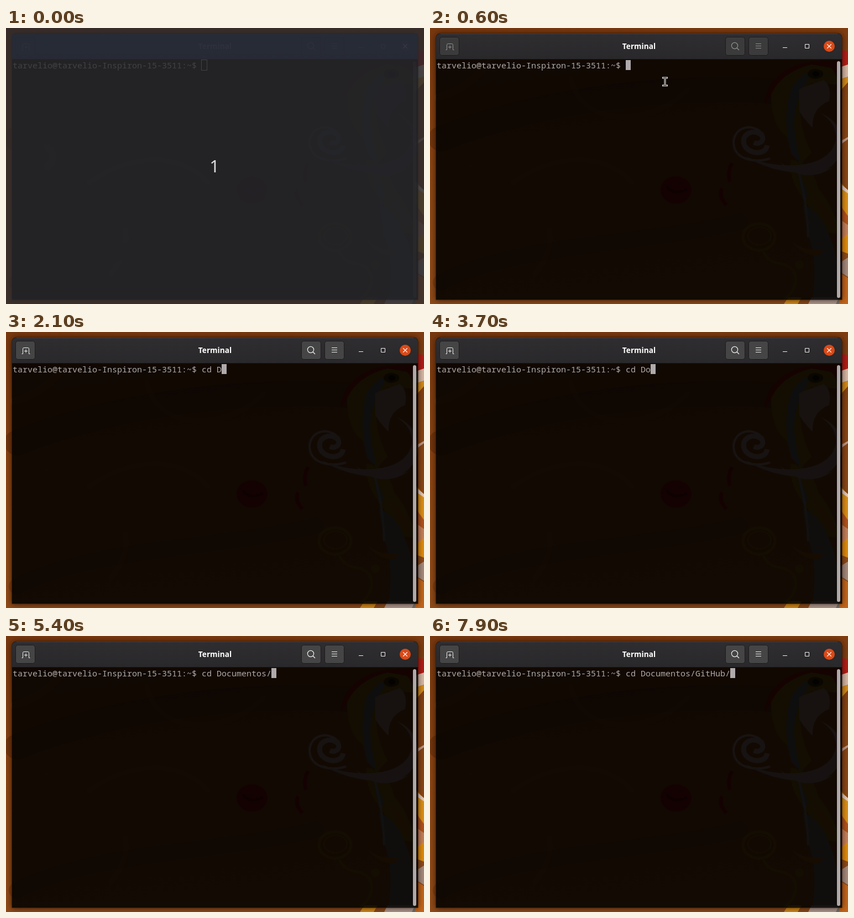
An HTML page with a canvas for the animation above (8000 ms loop, 756 by 499 pixels).

```html
<!DOCTYPE html>
<html lang="en">
<head>
<meta charset="utf-8">
<title>Terminal</title>
<style>
  html, body { margin: 0; width: 100%; height: 100%; overflow: hidden; background: #7a3a10; }
  canvas { display: block; }
</style>
</head>
<body>
<canvas id="stage" width="756" height="499"></canvas>
<script>
const W = 756, H = 499, LOOP = 8000, CELL = 9;
const ctx = document.getElementById('stage').getContext('2d');
const PROMPT = 'tarvelio@tarvelio-Inspiron-15-3511:~$ ';

// [start ms, typed text, block cursor visible]
const TYPING = [
  [0, '', true], [1100, '', false], [1300, 'c', true], [1500, 'cd', true],
  [1800, 'cd ', true], [2100, 'cd D', true], [2800, 'cd Do', true],
  [3100, 'cd Do', false], [3700, 'cd Do', true], [4800, 'cd Do', false],
  [5100, 'cd Do', true], [5400, 'cd Documentos/', true],
  [6000, 'cd Documentos/', false], [6700, 'cd Documentos/', true],
  [7200, 'cd Documentos/', false], [7400, 'cd Documentos/G', true],
  [7900, 'cd Documentos/GitHub/', true]
];

// [start ms, x, y]
const POINTER = [[100, 359, 70], [200, 392, 84], [300, 425, 97]];

const latest = (list, t) => list.filter(item => item[0] <= t).pop();
const grey = v => `rgb(${v},${v - 1},${v})`;

function fillRect(c, color, x, y, w, h) {
  c.fillStyle = color;
  c.fillRect(x, y, w, h);
}

function shape(c, color, d) {
  c.fillStyle = color;
  c.fill(new Path2D(d));
}

function line(c, color, width, d) {
  c.strokeStyle = color;
  c.lineWidth = width;
  c.stroke(new Path2D(d));
}

function roundRect(c, x, y, w, h, r) {
  c.beginPath();
  c.roundRect(x, y, w, h, r);
}

function ellipse(c, x, y, rx, ry) {
  c.beginPath();
  c.ellipse(x, y, rx, ry, 0, 0, Math.PI * 2);
}

function paintWallpaper(c) {
  const base = c.createLinearGradient(0, 0, 60, H);
  base.addColorStop(0, '#77370e');
  base.addColorStop(0.5, '#8a4412');
  base.addColorStop(1, '#8f4a18');
  fillRect(c, base, 0, 0, W, H);

  // broad dark sweeps
  c.lineCap = 'round';
  line(c, 'rgba(60,20,0,.28)', 46, 'M20 200C200 130 430 100 640 115');
  line(c, 'rgba(60,20,0,.2)', 30, 'M20 460C150 390 400 390 560 350');
  line(c, 'rgba(175,95,40,.22)', 9, 'M150 280C240 215 330 235 365 280M255 90C270 180 400 180 465 112M215 365Q225 400 190 445');
  line(c, 'rgba(175,95,40,.2)', 14, 'M15 125Q70 110 110 60M75 215Q95 235 75 250');
  c.lineCap = 'butt';

  // red crest and spots
  shape(c, '#a01410', 'M604 140Q610 95 645 75Q680 55 745 60L735 82Q690 75 660 88Q625 105 604 140Z');
  c.fillStyle = '#9c100e';
  ellipse(c, 445, 293, 28, 25);
  c.fill();
  line(c, '#6c0a0a', 5, 'M428 286Q440 304 464 292');
  line(c, '#9c100e', 7, 'M546 244Q538 260 542 278M528 290Q522 305 536 320');

  // head, neck and body
  shape(c, '#94700a', 'M617 120Q635 80 690 66L725 72Q738 85 735 102L690 100Q668 120 670 155Q672 190 690 225L672 245Q650 225 650 200Q616 180 617 120Z');
  shape(c, '#76706a', 'M652 112Q664 88 690 78L676 108Q654 150 660 190Q665 225 672 245L654 228Q636 170 652 112Z');
  shape(c, '#b08878', 'M668 110L712 94Q727 105 722 132Q690 145 692 180Q676 165 668 150Z');
  c.fillStyle = '#4c2c08';
  ellipse(c, 697, 83, 14, 9);
  c.fill();
  c.fillStyle = '#1c1008';
  ellipse(c, 698, 83, 6, 5);
  c.fill();
  shape(c, '#95700a', 'M652 238Q690 240 702 290Q728 318 742 372L720 370Q690 335 676 308Q650 280 652 238Z');
  shape(c, '#777067', 'M666 270Q680 280 684 306L674 308ZM675 320Q705 330 722 375Q742 420 742 499H690Q700 450 692 400Q682 370 675 320Z');
  shape(c, '#a95a10', 'M654 385Q675 405 712 400L704 411Q672 412 654 385ZM692 305Q725 320 735 365L715 350Z');
  line(c, '#8f8780', 4, 'M664 250Q682 310 684 378');

  // curls
  line(c, '#b6968c', 9, 'M610 212C607 232 574 228 568 210C563 193 582 183 596 191C609 199 598 213 586 207');
  line(c, '#b6968c', 4, 'M603 193C585 170 550 178 549 207C550 239 588 244 615 236');
  shape(c, '#b08f85', 'M570 232Q625 255 680 246Q728 236 734 202Q736 170 704 153Q748 170 745 215Q735 264 680 263Q615 260 570 232Z');
  shape(c, '#b08f85', 'M632 242Q675 272 728 252Q680 285 632 242Z');
  c.strokeStyle = '#94700a';
  c.lineWidth = 5;
  ellipse(c, 595, 378, 29, 24);
  c.stroke();
  c.lineWidth = 2;
  ellipse(c, 596, 376, 21, 16);
  c.stroke();
  line(c, '#94700a', 5, 'M603 405Q612 424 634 426Q664 432 661 460Q657 480 640 490');
  c.fillStyle = '#94700a';
  ellipse(c, 668, 428, 8, 8);
  c.fill();

  // bright details at the right and lower edges
  shape(c, '#b51c14', 'M738 38L756 42V70L738 72Z');
  shape(c, '#d8b8a4', 'M738 72L756 66V88L738 94Z');
  shape(c, '#d58a18', 'M738 94L756 88V98L738 118Z');
  shape(c, '#c29a86', 'M738 207L756 197V201L738 214Z');
  shape(c, '#e09014', 'M740 276L756 294V345L740 322Z');
  shape(c, '#e6cdbb', 'M740 280L756 293V299L740 288Z');
  shape(c, '#b4521a', 'M740 318L756 340V356L740 345Z');
  shape(c, '#c88058', 'M740 345L756 356V375L740 385Z');
  shape(c, '#e38b0c', 'M740 385L756 372V408L740 402Z');
  shape(c, '#a78b7c', 'M740 425L756 415V450L740 440Z');
  shape(c, '#c4651a', 'M740 442L756 452V499H740Z');
  shape(c, '#d98a16', 'M640 499L648 487H672L665 499Z');
  shape(c, '#b39a8e', 'M690 487H740L734 499H684Z');
}

const wallpaper = document.createElement('canvas');
wallpaper.width = W;
wallpaper.height = H;
paintWallpaper(wallpaper.getContext('2d'));

function paintButton(x, focused, lit) {
  roundRect(ctx, x + 0.5, 16.5, 35, 33, 4);
  ctx.fillStyle = grey(focused ? 60 + 10 * lit : 58);
  ctx.fill();
  ctx.strokeStyle = focused ? '#1d1b1d' : '#252325';
  ctx.lineWidth = 1;
  ctx.stroke();
}

function paintTitleBar(focused, lit) {
  const bar = ctx.createLinearGradient(0, 10, 0, 56);
  bar.addColorStop(0, focused ? '#2f2d30' : '#3c3a3c');
  bar.addColorStop(1, focused ? '#29282a' : '#393739');
  roundRect(ctx, 11, 10, 734, 47, [8, 8, 0, 0]);
  ctx.fillStyle = bar;
  ctx.fill();
  fillRect(ctx, focused ? '#454345' : '#4a484a', 19, 10, 718, 1);
  fillRect(ctx, '#171517', 11, 56, 734, 1);

  ctx.font = 'bold 13.7px "Noto Sans", sans-serif';
  ctx.textAlign = 'center';
  ctx.fillStyle = focused ? '#fff' : '#949193';
  ctx.fillText('Terminal', 378, 38);

  [17, 534, 576].forEach(x => paintButton(x, focused, lit));
  const icon = grey(Math.round(145 + 95 * lit));
  line(ctx, icon, 1, 'M28.5 39.5H30.5V30.5Q30.5 28.5 32.5 28.5H39.5Q41.5 28.5 41.5 30.5V39.5H43.5M33 34.5H39M36 31.5V37.5');
  ctx.lineWidth = 1.2;
  ellipse(ctx, 551, 32, 5.6, 5.6);
  ctx.stroke();
  line(ctx, icon, 1.3, 'M555 36L559 40');
  line(ctx, icon, 1, 'M589 28.5H599M589 32.5H599M589 36.5H599');

  const control = focused ? '#f4f2f3' : '#929092';
  line(ctx, control, 1, 'M638 35.5H646M678.5 29.5H685.5V36.5H678.5Z');
  ctx.fillStyle = focused ? '#da4a18' : '#514f51';
  ellipse(ctx, 722, 33, 10, 10);
  ctx.fill();
  line(ctx, '#f6f4f5', 1.3, 'M718.2 29.2L725.8 36.8M725.8 29.2L718.2 36.8');
}

function paintWindow(focused, lit) {
  ctx.drawImage(wallpaper, 0, 0);
  ctx.save();
  ctx.shadowColor = `rgba(0,0,0,${focused ? 0.6 : 0.45})`;
  ctx.shadowBlur = focused ? 12 : 8;
  ctx.shadowOffsetY = 1;
  roundRect(ctx, 10.5, 9.5, 735, 482, [8, 8, 0, 0]);
  ctx.fillStyle = '#24150c';
  ctx.fill();
  ctx.restore();
  ctx.drawImage(wallpaper, 11, 57, 734, 434, 11, 57, 734, 434);
  fillRect(ctx, 'rgba(0,0,0,.872)', 11, 57, 734, 434);
  paintTitleBar(focused, lit);

  roundRect(ctx, 736, 60, 6, 428, 3);
  ctx.fillStyle = focused ? '#b0a9a9' : 'rgba(176,169,169,.14)';
  ctx.fill();
}

function paintShell(text, cursorOn, focused) {
  ctx.font = '15px "Noto Sans Mono", monospace';
  ctx.textAlign = 'left';
  ctx.fillStyle = '#b0aaa9';
  ctx.fillText(PROMPT + text, 12, 73);
  const x = 12 + CELL * (PROMPT.length + text.length);
  if (!focused) {
    ctx.strokeStyle = '#b0aaac';
    ctx.lineWidth = 1;
    ctx.strokeRect(x - 0.5, 57.5, 10, 19);
  } else if (cursorOn) {
    fillRect(ctx, '#b0aaac', x, 58, CELL, 18);
  }
}

function paintPointer(x, y) {
  const beam = `M${x - 3.5} ${y - 7}H${x + 3.5}M${x - 3.5} ${y + 7}H${x + 3.5}M${x} ${y - 7}V${y + 7}`;
  ctx.lineCap = 'square';
  line(ctx, '#f2f0ee', 3, beam);
  line(ctx, '#151110', 1, beam);
  ctx.lineCap = 'butt';
}

function paintCountdown() {
  fillRect(ctx, 'rgba(40,41,46,.81)', 0, 0, W, H);
  fillRect(ctx, 'rgba(37,43,57,.6)', 11, 10, 734, 46);
  ctx.font = '31px "Noto Sans", sans-serif';
  ctx.textAlign = 'center';
  ctx.fillStyle = '#dcdcdd';
  ctx.fillText('1', 377, 261);
}

function render(t) {
  const focused = t >= 600;
  const lit = t < 700 ? 0 : t < 800 ? 0.5 : 1;
  const [, text, cursorOn] = latest(TYPING, t);
  paintWindow(focused, lit);
  paintShell(text, cursorOn, focused);
  if (t < 100) paintCountdown();
  else if (t < 1300) paintPointer(...latest(POINTER, t).slice(1));
}

const start = performance.now();
function tick() {
  render((performance.now() - start) % LOOP);
  requestAnimationFrame(tick);
}
tick();
</script>
</body>
</html>
```
